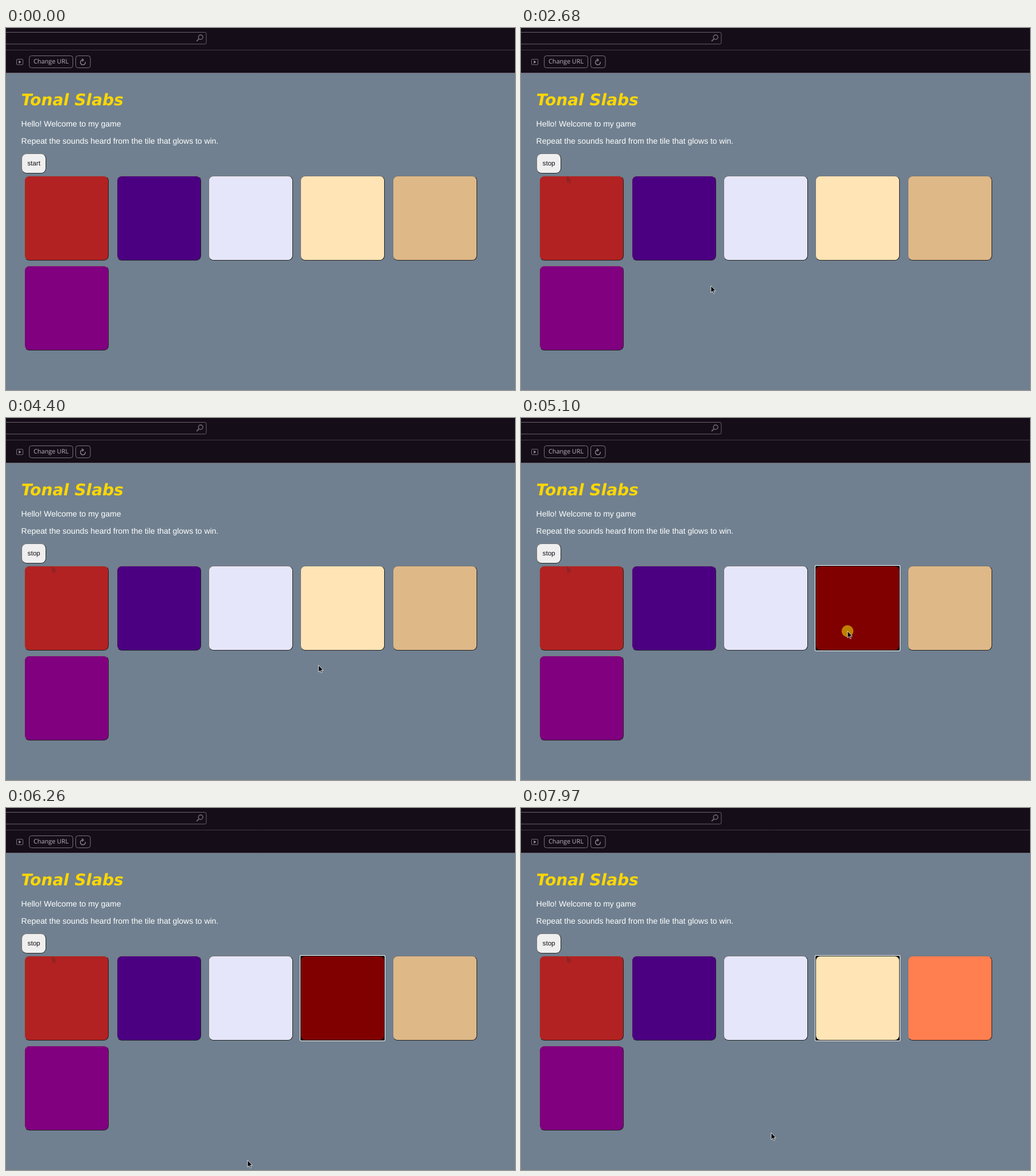
An HTML page with a canvas that plays this animation: 887 by 632 pixels, repeating every 8 s.

```html
<!DOCTYPE html>
<html lang="en">
<head>
<meta charset="utf-8">
<title>Tonal Slabs</title>
<style>
  html, body { margin: 0; width: 100%; height: 100%; overflow: hidden; background: #708090; }
  canvas, svg { position: absolute; left: 0; top: 0; width: 887px; height: 632px; }
  text { font-family: "Liberation Sans", Arial, sans-serif; font-size: 13.93px; fill: #fff; text-rendering: geometricPrecision; }
  .title { font: italic bold 28px "DejaVu Sans", Verdana, sans-serif; fill: #ffd700; }
  .tool { font: 500 10.8px "Open Sans", sans-serif; fill: #bcb5c0; }
  .label { font-size: 11.67px; fill: #151018; text-anchor: middle; }
</style>
</head>
<body>
<canvas id="stage" width="887" height="632"></canvas>
<svg viewBox="0 0 887 632">
  <defs>
    <path id="arrow" d="M0 0V12L2.8 9.5L4.6 13.5L6.4 12.7L4.7 8.8H8.3Z"/>
  </defs>
  <text class="tool" x="48" y="62">Change URL</text>
  <text class="title" x="26.5" y="135">Tonal Slabs</text>
  <text x="26.6" y="172">Hello! Welcome to my game</text>
  <text x="26.6" y="202">Repeat the sounds heard from the tile that glows to win.</text>
  <text class="label" id="label" x="48.6" y="240">start</text>
  <use id="trace" href="#arrow" x="80" y="258.5" fill="#6d2424" opacity=".5"/>
  <circle id="halo" r="10.3" fill="#ff0" opacity=".5"/>
  <use id="pointer" href="#arrow" fill="#000" stroke="#fff" stroke-width=".8"/>
</svg>
<script>
const LOOP = 8000, STEP = 78;
const ctx = document.getElementById('stage').getContext('2d');
const [label, trace, halo, pointer] =
  ['label', 'trace', 'halo', 'pointer'].map(id => document.getElementById(id));

const TILES = ['firebrick', 'indigo', '#e6e6fa', 'moccasin', 'burlywood', 'purple'];

// Game events in ms: a lit tile stays on for about a second
const START = { down: 1610, focus: 1690, up: 1820 };
const TAP = { down: 5100, up: 5250 };
const GLOWS = [[2830, 3850], [TAP.down, TAP.up], [6260, 7190]];
const NEXT_GLOW = 7580;

// Pointer stops: leave, arrive, x, y
const STOPS = [
  [0, 0, 852, 650],
  [70, 270, 400, 431],
  [440, 580, 131, 285],
  [730, 1040, 38, 230],
  [1280, 1360, 41, 231],
  [2130, 2280, 289, 403],
  [2510, 2680, 331, 450],
  [2980, 3450, 439, 517],
  [3700, 3930, 510, 516],
  [4080, 4720, 569, 372],
  [5650, 5730, 469, 553],
  [6260, 6260, 421, 615],
  [6340, 6420, 431, 593],
  [7580, 7970, 436, 567]
];

const within = (t, a, b) => t >= a && t < b;
const ease = k => (1 - Math.cos(Math.PI * k)) / 2;

// Each move is shown in even steps, the first one at once
function pointerAt(t) {
  let x = 0, y = 0;
  for (const [a, b, tx, ty] of STOPS) {
    if (t < a) break;
    const gaps = Math.round((b - a) / STEP);
    const passed = t >= b ? gaps : Math.floor((t - a) / (b - a) * gaps);
    const k = ease((passed + 1) / (gaps + 1));
    x += (tx - x) * k;
    y += (ty - y) * k;
  }
  return [x, y];
}

function round(x, y, w, h, r, fill) {
  ctx.beginPath();
  ctx.roundRect(x, y, w, h, r);
  ctx.fillStyle = fill;
  ctx.fill();
}

function stroke(color, width) {
  ctx.strokeStyle = color;
  ctx.lineWidth = width;
  ctx.stroke();
}

function frame(x, y, w, h, r, color) {
  ctx.beginPath();
  ctx.roundRect(x, y, w, h, r);
  stroke(color, 1);
}

function line(color, width, ...points) {
  ctx.beginPath();
  points.forEach(([x, y]) => ctx.lineTo(x, y));
  stroke(color, width);
}

function arc(x, y, r, from, to, color, width) {
  ctx.beginPath();
  ctx.arc(x, y, r, from, to);
  stroke(color, width);
}

// One half of a raised edge, split along the rising diagonal
function halfEdge(x, y, w, h, r, cornerX, cornerY, color) {
  const d = Math.min(w, h) / 2;
  ctx.save();
  ctx.beginPath();
  ctx.moveTo(x, y + h);
  ctx.lineTo(cornerX, cornerY);
  ctx.lineTo(x + w, y);
  ctx.lineTo(x + w - d, y + d);
  ctx.lineTo(x + d, y + h - d);
  ctx.clip();
  round(x, y, w, h, r, color);
  ctx.restore();
}

const inner = (x, y, w, h, r, fill) => round(x + 1, y + 1, w - 2, h - 2, r - 1, fill);

function raised(x, y, w, h, r, fill) {
  halfEdge(x, y, w, h, r, x, y, '#767676');
  halfEdge(x, y, w, h, r, x + w, y + h, '#222');
  inner(x, y, w, h, r, fill);
}

function focused(x, y, w, h, r, fill) {
  round(x - 1, y - 1, w + 2, h + 2, 2, '#fff');
  round(x, y, w, h, 1.5, '#101010');
  inner(x, y, w, h, r, fill);
}

function toolbar() {
  const dim = '#69636d', mid = '#79737d', bright = '#9a949e';
  ctx.fillStyle = '#150d18';
  ctx.fillRect(0, 0, 887, 79);
  line('#433d46', 1, [0, 38.5], [887, 38.5]);
  line(dim, 1, [0, 78.5], [887, 78.5]);
  frame(-6, 7.5, 355, 20.5, 2.5, dim);
  frame(40.5, 48.5, 76, 21, 4, mid);
  frame(121.5, 48.5, 25.5, 21, 4, mid);
  frame(18.5, 54.5, 11, 9.5, 1, mid);

  // Play triangle, magnifier, reload arrow
  ctx.fillStyle = bright;
  ctx.fill(new Path2D('M22.3 56.5L26.5 59.2L22.3 62Z'));
  arc(339.2, 16, 3.9, 0, 7, dim, 1.6);
  line(dim, 2, [336.3, 19], [332.2, 23]);
  arc(134, 60, 4.3, -0.2, 4.5, bright, 1.3);
  line(bright, 1.3, [132.2, 53.6], [135, 55.8], [132.8, 58.2]);
}

function tileColor(i, t) {
  if (i === 3 && GLOWS.some(([on, off]) => within(t, on, off))) return 'maroon';
  if (i === 4 && t >= NEXT_GLOW) return 'coral';
  return TILES[i];
}

function draw(t) {
  ctx.fillStyle = '#708090';
  ctx.fillRect(0, 0, 887, 632);
  toolbar();

  const button = within(t, START.focus, START.up) ? focused : raised;
  button(27, 219, 43, 35, 9, '#efefef');

  TILES.forEach((_, i) => {
    const left = 32.1 + (i % 5) * 160.4;
    const x = Math.round(left), w = Math.round(left + 147) - x;
    const y = 258 + Math.floor(i / 5) * 157;
    const tile = i === 3 && t >= TAP.down ? focused : raised;
    tile(x, y, w, 148, 8.5, tileColor(i, t));
  });

  label.textContent = t < START.up ? 'start' : 'stop';

  const place = `translate(${pointerAt(t).join(' ')})`;
  const pressed = [START, TAP].some(p => within(t, p.down, p.up));
  pointer.setAttribute('transform', place);
  halo.setAttribute('transform', place);
  halo.style.display = pressed ? '' : 'none';
  pointer.style.display = t < 70 ? 'none' : '';
  trace.style.display = t < 880 ? 'none' : '';
}

const began = performance.now();
function tick() {
  draw((performance.now() - began) % LOOP);
  requestAnimationFrame(tick);
}
tick();
</script>
</body>
</html>
```
